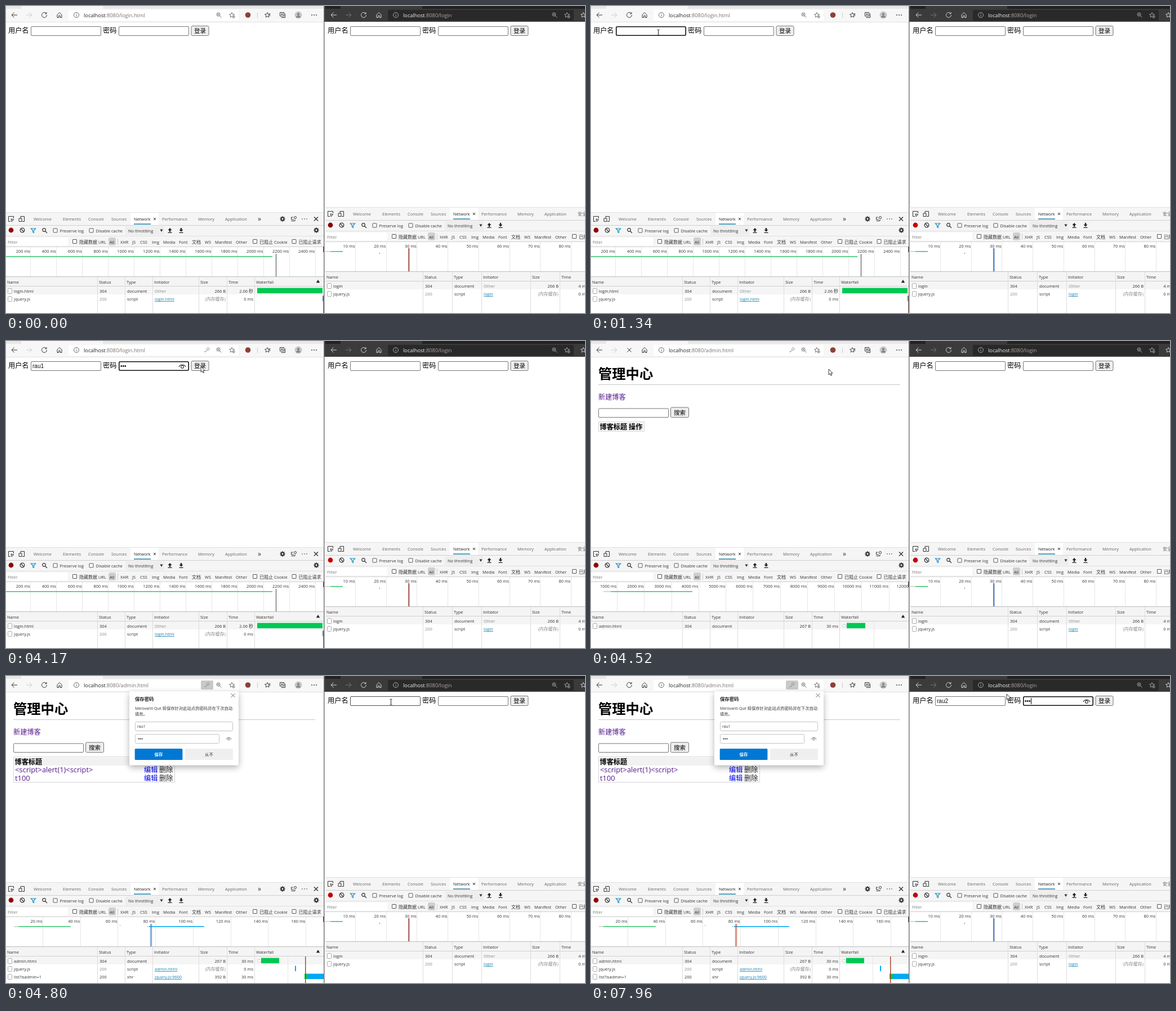
An HTML page with a canvas for the animation above (7.99 s loop, 1028x545 px).

```html
<!DOCTYPE html>
<html lang="zh">
<head>
<meta charset="utf-8">
<style>
html, body { margin: 0; width: 100%; height: 100%; overflow: hidden; background: #fff; }
canvas { display: block; }
</style>
</head>
<body>
<canvas id="stage" width="1028" height="545"></canvas>
<script>
const g = document.getElementById('stage').getContext('2d');
const LOOP = 7990, LOADED = 4330, LISTED = 4650, SWITCH = 4980;
const INK = '#333', DIM = '#888', LINE = '#d0d0d0', GREEN = '#00c853', BLUE = '#03a9f4', RED = '#b5452c';

// ---- drawing helpers ----
function rect(x, y, w, h, color) {
  g.fillStyle = color;
  g.fillRect(x, y, w, h);
}
// The border lies inside the given size.
function box(x, y, w, h, r, fill, stroke, width = 1) {
  const inset = stroke ? width / 2 : 0;
  g.beginPath();
  g.roundRect(x + inset, y + inset, w - 2 * inset, h - 2 * inset, r);
  if (fill) { g.fillStyle = fill; g.fill(); }
  if (stroke) { g.strokeStyle = stroke; g.lineWidth = width; g.stroke(); }
}
// Strokes an icon path, or fills it when width is 0.
function icon(d, x, y, color, width = 1) {
  g.save();
  g.translate(x, y);
  const p = new Path2D(d);
  if (width) { g.strokeStyle = color; g.lineWidth = width; g.stroke(p); }
  else { g.fillStyle = color; g.fill(p); }
  g.restore();
}
const ring = (r, x = 0, y = 0) =>
  `M${x + r} ${y}A${r} ${r} 0 1 1 ${x - r} ${y} ${r} ${r} 0 1 1 ${x + r} ${y}`;

// Han and Latin runs use different fonts and sizes.
function text(s, x, y, size = 8, color = INK, { bold, align } = {}) {
  const runs = s.match(/[\u2e80-\uffef]+|[^\u2e80-\uffef]+/g).map(run => {
    const font = /[\u2e80-\uffef]/.test(run)
      ? `${size}px "Noto Sans CJK SC", "Noto Sans CJK", sans-serif`
      : `${size * 0.93}px "Open Sans", "Noto Sans", sans-serif`;
    g.font = (bold ? 'bold ' : '') + font;
    return { run, font: g.font, width: g.measureText(run).width };
  });
  const total = runs.reduce((sum, r) => sum + r.width, 0);
  if (align) x -= align === 'right' ? total : total / 2;
  g.fillStyle = color;
  for (const r of runs) {
    g.font = r.font;
    g.fillText(r.run, x, y);
    x += r.width;
  }
  return total;
}

// ---- browser toolbar ----
const STAR = 'M0-4.5 1.3-1.5 4.5-1.2 2 .9 2.8 4 0 2.3-2.8 4-2 .9-4.5-1.2-1.3-1.5Z';
const RELOAD = 'M3.4-3A4.5 4.5 0 1 0 4.5 0M4-5V-2.2H1.2';
const CROSS = 'M-3.5-3.5 3.5 3.5M-3.5 3.5 3.5-3.5';
const EYE = 'M-4.5 1.5C-3-3 3-3 4.5 1.5' + ring(1.7, 0, 1.2);

function toolbar(dark, path, loading) {
  const ink = dark ? '#d6d6d6' : INK, soft = dark ? '#aaa' : '#666';
  const bar = dark ? '#3b3b3b' : '#f7f7f7', field = dark ? '#292929' : '#fff';
  rect(0, 0, 565, 28, bar);
  rect(0, 0, 27, 5, dark ? '#222' : '#e8e8e8');
  rect(172, 0, 393, 5, dark ? '#222' : '#e8e8e8');
  if (!dark) rect(0, 28, 565, 1, '#e2e2e2');
  box(111, 7, dark ? 330 : 302, 19, 2, field);
  icon('M5 0H-5M-.5-4.5-5 0-.5 4.5', 15, 16, ink);
  icon('M-5 0H5M.5-4.5 5 0 .5 4.5', 41, 16, dark ? '#777' : '#ccc');
  icon(loading ? CROSS : RELOAD, 68, 16, ink);
  icon('M-4-.5 0-4.5 4-.5V4.5H1.2V1.2H-1.2V4.5H-4Z', 95, 16, ink);
  icon(ring(4.5) + 'M0-.5V2.5M0-2.7V-1.6', 125, 16, soft);
  const w = text('localhost', 138, 20, 9.93, dark ? '#f0f0f0' : '#222');
  text(':8080/' + path, 138 + w, 20, 9.93, dark ? '#b0a8a0' : '#77706a');
  const right = dark ? 407 : 378;
  icon(ring(3, -1, -1) + 'M1.2 1.2 4.5 4.5M-2.5-1H.5M-1-2.5V.5', right, 16, soft, 0.9);
  const star = dark ? 429 : 401;
  icon(STAR, star, 16, soft, 0.9);
  icon(ring(2.6), star + 3, 19, field, 0);
  icon(ring(2.2) + 'M-1.2 0H1.2M0-1.2V1.2', star + 3, 19, soft, 0.8);
  icon(STAR + 'M2-2H5.5M3 1H5.5', dark ? 458 : 464, 16, ink, 0.9);
  if (dark) return;
  icon(ring(4.8), 429.5, 16, '#8c4038', 0);
  rect(446, 12, 1, 9, '#ccc');
  icon('M-4.5-4.5H2.5V2H-4.5ZM4.5-2.5V4.5H-2.5M-1-3V.6M-2.8-1.2H.8', 491, 16, ink);
  icon(ring(6.5), 519, 16, '#c8c8c8', 0);
  icon(ring(2.2, 0, -1.5) + 'M-4 4.5A4 3.5 0 0 1 4 4.5Z', 519, 16, '#858585', 0);
  for (const x of [-4, 0, 4]) icon(ring(0.9), 547 + x, 16, ink, 0);
}
function key(open) {
  if (open) box(346, 8, 22, 16, 2, '#c9c9c9');
  icon(ring(2.2, 1.8, -1.8) + 'M.2-.2-4 4M-4 4V2.2M-2.2 2.2-1 3.4', 357, 16, '#8a8a8a', 0.9);
}

// ---- developer tools ----
function check(x, y) {
  box(x - 4, y - 4, 8, 8, 0.5, '#fff', '#555');
}
function gear(x, y) {
  icon('M0-4.7V4.7M-4.7 0H4.7M-3.3-3.3 3.3 3.3M-3.3 3.3 3.3-3.3', x, y, INK, 1.7);
  icon(ring(3.4), x, y, INK, 0);
  icon(ring(1.4), x, y, '#fff', 0);
}
const TABS = { Welcome: 49, Elements: 101, Console: 146, Sources: 187, Network: 227,
  Performance: 277, Memory: 341, Application: 389 };
const FILTERS = { All: 184, XHR: 203, JS: 224, CSS: 238, Img: 259, Media: 279, Font: 307,
  文档: 330, WS: 353, Manifest: 371, Other: 408, '已阻止 Cookie': 450, 已阻止请求: 519.5 };

function tools(dark, record) {
  rect(0, 366, 565, 200, '#fff');
  rect(0, 366, 565, 61, '#f5f5f5');
  rect(0, 366, 565, 1, '#e0e0e0');
  rect(221, 367, 50, 22, '#fff');
  for (const [name, x] of Object.entries(TABS))
    text(name, x, 381, 8, name === 'Network' ? '#222' : '#666');
  icon('M-2-2 2 2M-2 2 2-2', 264, 378, INK);
  rect(227, 386.4, 30, 1.5, '#1a7fa8');
  rect(0, 389, 565, 1, LINE);
  icon('M-1 4.5H-4.5V-4.5H4.5V-1M0 0 1.3 5 2.5 2.5 5 1.3Z', 9, 378, INK);
  icon('M-2-1V-4.5H4.5V4.5H1M-5-1H0V4.5H-5Z', 28, 378, INK);
  if (dark) text('安全性', 448, 381, 8, '#666');
  else {
    text('»', 447, 382, 13);
    gear(491, 378);
    icon(ring(2, 2.5, -2.5) + 'M-4.5-3H-1.5M-4.5 3.5H2V1M-4.5-3V1H0', 511, 378, INK);
    for (const x of [-4, 0, 4]) icon(ring(0.8), 530 + x, 378, INK, 0);
    icon(CROSS, 550.5, 378, INK, 1.4);
    gear(551, 398);
  }
  icon(ring(4.4), 9, 398, record, 0);
  icon(ring(3.8) + 'M-2.7-2.7 2.7 2.7', 29, 398, INK, 1.3);
  icon('M-4.2-3.5H4.2L1-.2V4L-1 3V-.2Z', 48.5, 398.5, '#1a8fc0', 1.2);
  icon(ring(2.8, -1, -1) + 'M1 1 4.5 4.5', 68.5, 398.5, INK, 1.2);
  check(87.5, 398.5);
  text('Preserve log', 95.5, 402);
  check(151.5, 398.5);
  text('Disable cache', 159.5, 402);
  rect(212, 391, 69, 16, '#eee');
  text('No throttling', 217, 402);
  icon('M-2.5-2H2.5L0 2.5Z', 276, 398.5, INK, 0);
  icon('M0-4.5 3.5-.5H1.2V2.5H-1.2V-.5H-3.5ZM-3.5 3.3H3.5V4.4H-3.5Z', 291, 398.5, '#222', 0);
  icon('M0 2.2 3.5-1.5H1.2V-4.5H-1.2V-1.5H-3.5ZM-3.5 3.3H3.5V4.4H-3.5Z', 311, 398.5, '#222', 0);
  rect(0, 408, 565, 1, '#e0e0e0');
  rect(0, 411, 110, 14, '#fff');
  text('Filter', 3, 421.5, 8, '#777');
  for (const x of [122, 442, 511.5]) check(x, 418);
  text('隐藏数据 URL', 130, 421.5);
  box(182, 411, 13, 14, 3, '#cfcfcf');
  rect(198, 413, 1, 11, '#ccc');
  for (const [name, x] of Object.entries(FILTERS)) text(name, x, 421.5);
  rect(0, 427, 565, 1, LINE);
}

function overview(first, step, unit) {
  for (let i = 0; first + i * step < 610; i++) {
    const x = first + i * step;
    rect(Math.round(x), 428, 1, 52, '#e6e6e6');
    text((i + 1) * unit + ' ms', x - 0.5, 438, 8, INK, { align: 'right' });
  }
}
// A request in the overview: grey while waiting, then coloured.
function span(wait, from, to, color = '#3cc972') {
  rect(wait, 444, from - wait, 1.5, '#ccc');
  rect(from, 444, to - from, 1.6, color);
}
function bar(x, row, w, color) {
  rect(x, 500.5 + row * 14, w, 9.5, color);
}
function table(cols, rows) {
  const heads = ['Name', 'Status', 'Type', 'Initiator', 'Size', 'Time', 'Waterfall'];
  rect(0, 480, 565, 18, '#f4f4f4');
  rect(0, 480, 565, 1, '#bbb');
  rect(0, 497, 565, 1, LINE);
  rect(0, 498, 565, 14, '#f5f5f5');
  heads.forEach((h, i) => {
    if (i) rect(cols[i] - 1, 481, 1, 80, '#dcdcdc');
    text(h, cols[i] + 2, 493);
  });
  rows.forEach(([name, status, type, from, size, time], i) => {
    const y = 509 + i * 14, cached = size[0] === '(';
    box(3, y - 8, 8, 10, 1, '#fff', '#aaa');
    text(name, 14, y);
    text(status, cols[1] + 3, y, 8, cached ? DIM : INK);
    text(type, cols[2] + 3, y);
    if (from) {
      const link = from !== 'Other';
      const w = text(from, cols[3] + 3, y, 8, link ? '#1580b0' : DIM);
      if (link) rect(cols[3] + 3, y + 1, w, 0.8, '#1580b0');
    }
    text(size, cols[5] - 3, y, 8, cached ? DIM : INK, { align: 'right' });
    text(time, cols[6] - 3, y, 8, INK, { align: 'right' });
  });
}

const COLS = [0, 163, 212, 261, 343, 393, 442];
const WIDE = [0, 174, 226, 278, 365, 417, 469];
const ADMIN = ['admin.html', '304', 'document', '', '267 B', '30 ms'];
const script = from => ['jquery.js', '200', 'script', from, '(内存缓存)', '0 ms'];

function leftNetwork(t) {
  if (t < LOADED) {
    overview(43.4, 45.95, 200);
    span(0, 0, 473);
    rect(479, 440, 1, 40, '#444');
    table(COLS, [['login.html', '304', 'document', 'Other', '266 B', '2.06 秒'], script('login.html')]);
    bar(446, 0, 116, GREEN);
    bar(562, 1, 2, '#527a90');
  } else if (t < LISTED) {
    overview(46, 48.25, 1000);
    span(22, 35, 180);
    table(COLS, [ADMIN]);
    rect(502, 498, 1, 47, '#e6e6e6');
    box(446, 503, 8, 5, 1, '#fff', '#ccc');
    bar(454, 0, 33, GREEN);
  } else {
    overview(65, 66.7, 20);
    span(14, 22, 115);
    rect(202, 442, 1, 1.5, '#999');
    span(250, 254, 352, BLUE);
    rect(256, 440, 1, 40, '#3b78c4');
    rect(258, 440, 1, 40, RED);
    table(COLS, [ADMIN, script('admin.html'),
      ['list?isadmin=1', '200', 'xhr', 'jquery.js:9600', '392 B', '30 ms']]);
    rect(500, 498, 1, 47, '#e6e6e6');
    box(446, 503, 7, 5, 1, '#fff', '#ccc');
    bar(453, 0, 32, GREEN);
    bar(513, 1, 2, BLUE);
    bar(530, 2, 6, GREEN);
    bar(536, 2, 28, BLUE);
    rect(531, 498, 1.5, 47, RED);
  }
  icon('M-3.2 2.3H3.2L0-3Z', 554, 489, '#222', 0);
}
function rightNetwork() {
  overview(53, 54.7, 10);
  span(0, 9, 31);
  rect(96, 447, 1, 2, '#777');
  rect(147, 439, 1.3, 41, RED);
  rect(148.6, 439, 1, 41, '#3b78c4');
  table(WIDE, [['login', '304', 'document', 'Other', '266 B', '4 ms'], script('login')]);
}

// ---- pages ----
function button(x, y, w, h, label) {
  box(x, y, w, h, 2, '#efefef', '#767676');
  text(label, x + w / 2, y + h / 2 + 4, 10.6, '#000', { align: 'center' });
}
// Typed text and caret follow from the focus span and the key times.
function field(t, x, { from, to, keys, value, hover }) {
  const focused = t >= from && t < to;
  const count = keys.filter(k => t >= k).length;
  if (focused) box(x, 36, 125, 17, 2, '#fff', '#101010', 1.6);
  else box(x, 36, 125, 17, 1.5, '#fff', hover ? '#4f4f4f' : '#767676');
  const shown = value ? value.slice(0, count) : '•'.repeat(count);
  g.font = '10.1px "Liberation Sans", Arial, sans-serif';
  g.fillStyle = '#111';
  g.fillText(shown, x + 3, 48);
  if (!value && focused && count)
    icon('M-6 1.5C-4-3.5 4-3.5 6 1.5' + ring(2.4, 0, 1.4), x + 113, 44.5, '#222', 1.1);
  const since = t - Math.max(from, keys[count - 1] || 0);
  if (focused && since % 1000 < 500)
    rect(Math.round(x + 3 + g.measureText(shown).width), 39, 1, 11, '#000');
}
function login(t, user, pass) {
  text('用户名', 4, 48, 12.2, '#000');
  field(t, 44, user);
  text('密码', 172, 48, 12.2, '#000');
  field(t, 200, pass);
  button(328.5, 35, 32, 18, '登录');
}
function admin(full) {
  const purple = '#551a8b';
  text('管理中心', 13, 67, 24.3, '#000', { bold: true });
  rect(13, 77, 536, 1, '#c8c8c8');
  text('新建博客', 13, 104, 12.2, purple);
  box(13, 119.4, 125, 16.6, 1.5, '#fff', '#767676');
  button(141, 117.4, 33, 18.6, '搜索');
  const width = full ? 287 : 82;
  box(13, 143, width, full ? 46 : 18, 0, '#fff', '#d5d5d5');
  rect(15, 145, width - 4, 14, '#f1f1f1');
  text('博客标题', 15.5, 157, 12.2, '#000', { bold: true });
  text('操作', full ? 258 : 67, 157, 12.2, '#000', { bold: true });
  if (!full) return;
  ['<script>alert(1)<script>', 't100'].forEach((title, i) => {
    const y = 171 + i * 14.5;
    text(title, 16, y, 13.85, purple);
    text('编辑', 245, y, 12.2, '#0000ee');
    text('删除', 272, y, 12.2, '#222');
  });
}
function popup() {
  g.save();
  g.shadowColor = 'rgba(0,0,0,.3)';
  g.shadowBlur = 12;
  g.shadowOffsetY = 4;
  box(219, 27, 194, 131.5, 2, '#fff');
  g.restore();
  text('保存密码', 229, 43.5, 8.4, '#222', { bold: true });
  icon(CROSS, 403, 34.5, '#84606a');
  text('Merovanti Quil 将保存针对此站点的密码并在下次自动', 229, 59.5, 7.34);
  text('填充。', 229, 70, 7.34);
  box(229, 81, 174, 17, 2, '#fff', '#c4c4c4');
  text('rau1', 233, 92, 7.4);
  box(229, 103, 150, 17, 2, '#fff', '#c4c4c4');
  for (const x of [235.5, 238.5, 241.5]) icon(ring(1.1), x, 111.5, '#222', 0);
  icon(EYE, 395.5, 111, '#735f66', 0.9);
  box(228.7, 129, 84.7, 20, 1.5, '#0078d4');
  text('保存', 271, 142, 7.4, '#fff', { bold: true, align: 'center' });
  box(318, 129, 85, 20, 1.5, '#efefef');
  text('从不', 360.5, 142, 7.4, INK, { align: 'center' });
}

// ---- pointer ----
const PATH = [[60, 1010, 545], [780, 119, 47], [3690, 119, 47], [4080, 345, 45], [4440, 352, 47],
  [4520, 422, 50], [4700, 655, 47], [4790, 683, 46], [7740, 683, 46], [7950, 738, 32]];
function pointerAt(t) {
  if (t < PATH[0][0]) return null;
  const i = PATH.findIndex(p => p[0] > t);
  if (i < 0) return PATH[PATH.length - 1].slice(1);
  const [t0, x0, y0] = PATH[i - 1], [t1, x1, y1] = PATH[i];
  const u = (t - t0) / (t1 - t0), e = u * u * (3 - 2 * u);
  return [x0 + (x1 - x0) * e, y0 + (y1 - y0) * e];
}
function pointer(x, y, t) {
  const over = a => x > a && x < a + 125 && y > 36 && y < 53;
  const fields = t < LOADED ? [44, 200, 611, 767] : [611, 767];
  if (fields.some(over))
    icon('M-2-5H-.5L0-4.5 .5-5H2M0-4.5V4.5M-2 5H-.5L0 4.5 .5 5H2', Math.round(x) + 0.5, y, '#222');
  else {
    const arrow = 'M0 0V10L2.3 7.8 4 11.5 5.6 10.8 4 7.2H7Z';
    icon(arrow, x, y, '#fff', 0);
    icon(arrow, x, y, '#222', 0.9);
  }
}

// ---- scene ----
function pane(x, width, draw) {
  g.save();
  g.beginPath();
  g.rect(x, 0, width, 545);
  g.clip();
  g.translate(x, 0);
  draw();
  g.restore();
}
function frame(t) {
  rect(0, 0, 1028, 545, '#fff');
  const mouse = pointerAt(t), loaded = t >= LOADED, listed = t >= LISTED;
  pane(0, 564, () => {
    toolbar(false, loaded ? 'admin.html' : 'login.html', loaded && !listed);
    if (t >= 3150) key(listed);
    if (loaded) admin(listed);
    else login(t,
      { from: 830, to: 2730, keys: [1570, 1700, 1820, 2250], value: 'rau1' },
      { from: 2730, to: LOADED, keys: [3180, 3300, 3410] });
    tools(false, '#8e0000');
    leftNetwork(t);
    if (listed) popup();
  });
  pane(565, 463, () => {
    g.translate(2, 0);
    rect(-2, 0, 2, 28, '#3b3b3b');
    toolbar(true, 'login');
    const hover = mouse && mouse[0] > 611 && mouse[0] < 736 && mouse[1] > 36 && mouse[1] < 53;
    login(t,
      { from: SWITCH, to: 7160, keys: [5760, 5860, 6730, 6830], value: 'rau2', hover },
      { from: 7160, to: LOOP, keys: [7490, 7600, 7720] });
    g.translate(0, -9);
    tools(true, t < 830 ? '#860000' : '#c40000');
    rightNetwork();
  });
  rect(564, 0, 1.5, 545, '#777');
  rect(563, 427, 2, 10, '#555');
  if (t < LOADED) rect(563, 514, 1, 31, '#8a6a60');
  if (mouse) pointer(...mouse, t);
}
function tick() {
  frame(performance.now() % LOOP);
  requestAnimationFrame(tick);
}
tick();
</script>
</body>
</html>
```
